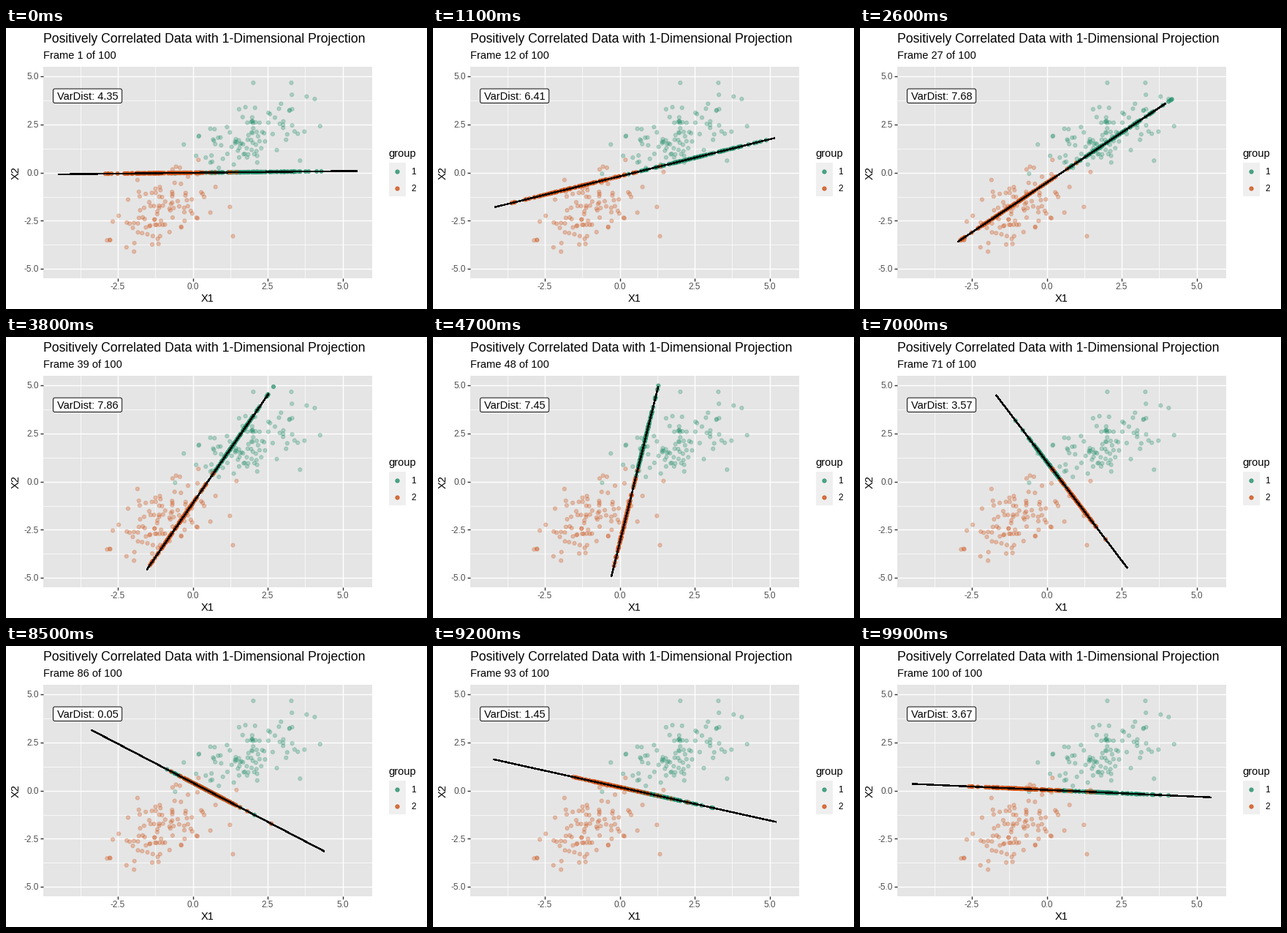
Animation, 576 px wide and 384 px high, one loop 10000 ms. Source, as a matplotlib script:

```python
import numpy as np
import matplotlib.pyplot as plt
from matplotlib.animation import FuncAnimation
from matplotlib.collections import LineCollection
from matplotlib.colors import to_rgba
from matplotlib.patches import FancyBboxPatch, Rectangle

plt.rcParams["font.family"] = "Liberation Sans"

W, H, DPI = 576, 384, 96
FRAMES, INTERVAL = 100, 100
LEFT, RIGHT, TOP, BOTTOM = 50.6, 501.5, 52.8, 342.4
GREEN, ORANGE = "#26916E", "#CE5216"
PIVOT = np.array([0.5, 0.0])
DOT = dict(s=3.9 ** 2, linewidths=0.71)

# The few points that mark the rim of each cloud.
RIM_1 = [(2.02, 4.66), (3.29, 4.66), (3.80, 3.95), (4.07, 3.82),
         (4.25, 2.41), (3.58, 0.62), (-0.30, 1.46), (-0.59, -0.06)]
RIM_2 = [(-2.77, -3.49), (-2.67, -2.54), (-1.96, -4.10), (1.34, -3.30),
         (1.24, -1.78), (1.46, 0.03), (0.19, 0.66), (-2.16, -1.40)]


def build_group(rim, mean, rng, size=100):
    """Fill a cloud with correlated normals that stay inside its rim."""
    z = rng.standard_normal((500, 2))
    z = z[np.hypot(z[:, 0], z[:, 1]) < 2][:size - len(rim)]
    root = np.linalg.cholesky([[1.07, 0.5], [0.5, 1.23]])
    return np.vstack([rim, (z - z.mean(axis=0)) @ root.T + mean])


rng = np.random.default_rng(7)
group1 = build_group(RIM_1, (1.9, 1.9), rng)
group2 = build_group(RIM_2, (-1.0, -1.95), rng)
points = np.vstack([group1, group2])
hues = [GREEN] * len(group1) + [ORANGE] * len(group2)


def angle_at(i):
    """Angle of the line: 5 degree steps, held three frames, later two."""
    step = (i + 1) // 3 if i < 88 else 30 + (i - 88) // 2
    return np.radians(1 + 5 * step)


def var_dist(t):
    """Squared distance of projected means over the within-group variance."""
    between = (3 * np.cos(t) + 4.12 * np.sin(t)) ** 2
    within = 2.2959 - 0.1628 * np.cos(2 * t) + 1.0165 * np.sin(2 * t)
    return between / within


fig = plt.figure(figsize=(W / DPI, H / DPI), dpi=DPI, facecolor="white")


def write(x, y, text, size=11, color="black", ha="left", **kw):
    """Place text with its baseline at pixel (x, y) from the top left."""
    return fig.text(x / W, 1 - y / H, text, fontsize=size, color=color,
                    ha=ha, va="baseline", **kw)


def pixel_axes():
    layer = fig.add_axes([0, 0, 1, 1])
    layer.set(xlim=(0, W), ylim=(H, 0))
    layer.axis("off")
    return layer


def dots(ax, xy, colors, alpha, **kw):
    rgba = [to_rgba(c, alpha) for c in colors]
    return ax.scatter(xy[:, 0], xy[:, 1], facecolors=rgba, edgecolors=rgba,
                      **DOT, **kw)


# Panel
ax = fig.add_axes([LEFT / W, 1 - BOTTOM / H,
                   (RIGHT - LEFT) / W, (BOTTOM - TOP) / H])
ax.set(xlim=(-5, 6), ylim=(-5.5, 5.5), facecolor="#E5E5E5")
ax.set_axisbelow(True)
for spine in ax.spines.values():
    spine.set_visible(False)
y_ticks = np.arange(-5, 5.1, 2.5)
x_ticks = y_ticks[1:]
minor = np.arange(-3.75, 4, 2.5)
ax.set_xticks(x_ticks)
ax.set_yticks(y_ticks)
ax.set_xticks(minor, minor=True)
ax.set_yticks(minor, minor=True)
ax.grid(which="major", color="white", linewidth=1.07)
ax.grid(which="minor", color="white", linewidth=0.53)
ax.tick_params(which="major", length=2.75, width=1.07, color="#333333",
               labelbottom=False, labelleft=False)
ax.tick_params(which="minor", length=0)

x_scale, y_scale = (RIGHT - LEFT) / 11, (BOTTOM - TOP) / 11
for v in x_ticks:
    write(LEFT + (v + 5) * x_scale, 357, f"{v:.1f}", 8.8, "#4D4D4D", "center")
for v in y_ticks:
    write(44.6, TOP + (5.5 - v) * y_scale + 4.2, f"{v:.1f}", 8.8,
          "#4D4D4D", "right")

# Titles
write(51, 20, "Positively Correlated Data with 1-Dimensional Projection", 13.2)
subtitle = write(51, 42, "")
write((LEFT + RIGHT) / 2, 374, "X1", ha="center")
write(18, (TOP + BOTTOM) / 2, "X2", ha="center", rotation=90,
      rotation_mode="anchor")

# Data, projections and line
dots(ax, points, hues, 0.3, zorder=3)
shadow = dots(ax, points, hues, 0.7, zorder=4)
line = LineCollection([], colors="black", linewidths=1.07, zorder=5)
ax.add_collection(line, autolim=False)

# Legend and value box
over = pixel_axes()
write(523.8, 176, "group")
for k, hue in enumerate((GREEN, ORANGE)):
    y = 184.3 + 23.04 * k
    over.add_patch(Rectangle((523.8, y), 23.04, 23.04, color="#EFEFEF", lw=0))
    spot = np.array([[535.3, y + 11.5]])
    dots(over, spot, [hue], 0.3, zorder=3)
    dots(over, spot, [hue], 0.7, zorder=4)
    write(554.2, y + 15.7, str(k + 1), 8.8)
over.add_patch(FancyBboxPatch(
    (64.5, 83.1), 94.2, 19.4, boxstyle="round,pad=0,rounding_size=2.4",
    facecolor="white", edgecolor="black", linewidth=0.71))
value = write(111.6, 98, "", ha="center")


def update(i):
    t = angle_at(i)
    u = np.array([np.cos(t), np.sin(t)])
    shadow.set_offsets(PIVOT + np.outer((points - PIVOT) @ u, u))
    # One segment per data row, so the soft edges build up to solid black.
    line.set_segments([[PIVOT - 5 * u, PIVOT + 5 * u]] * len(points))
    subtitle.set_text(f"Frame {i + 1} of {FRAMES}")
    value.set_text(f"VarDist: {var_dist(t):.2f}")
    return shadow, line, subtitle, value


anim = FuncAnimation(fig, update, frames=FRAMES, interval=INTERVAL,
                     repeat=True, blit=False)
plt.show()
```
